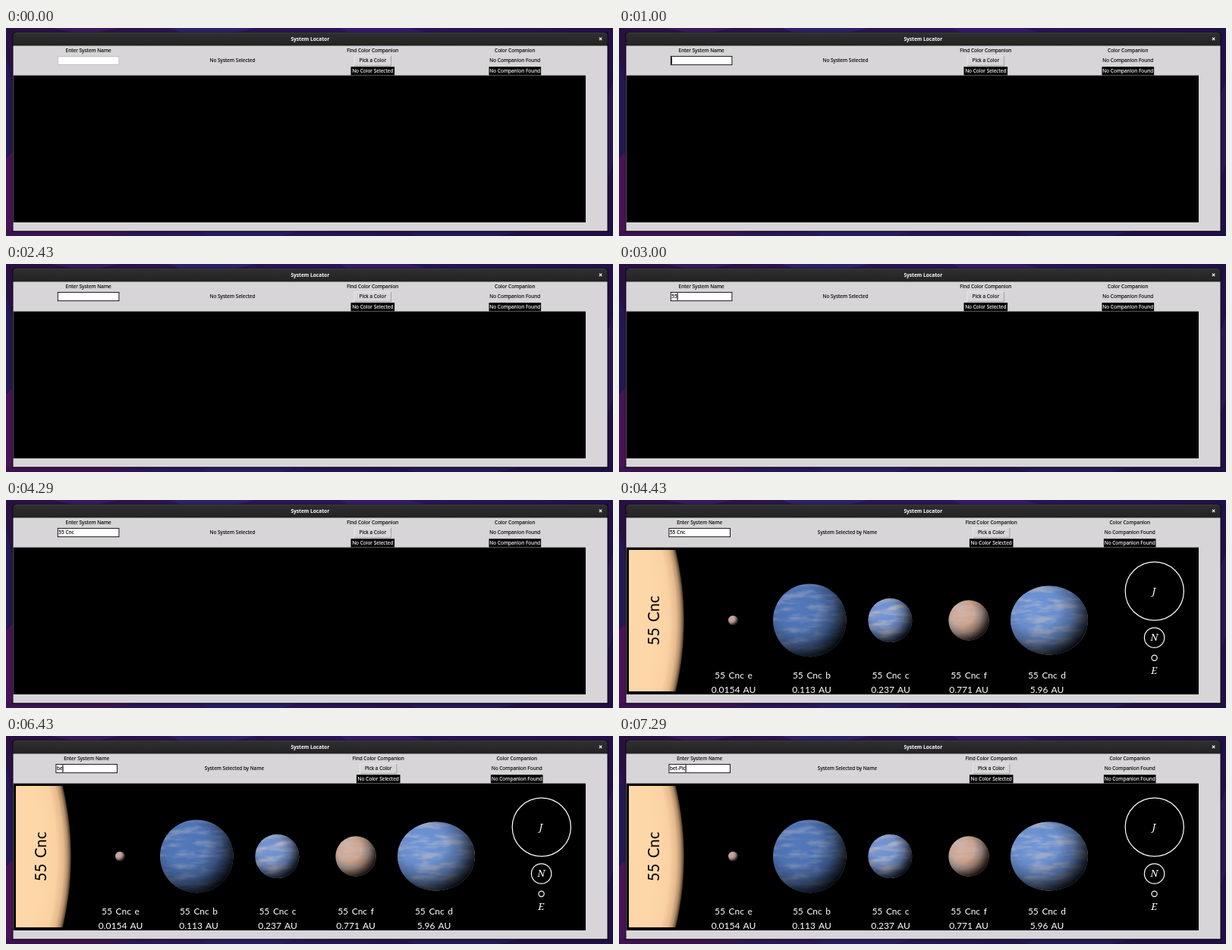
Write an HTML page that moves like this. It is 800x275 px and loops after 8000 ms.

```html
<!DOCTYPE html>
<html lang="en">
<head>
<meta charset="utf-8">
<title>System Locator</title>
<style>
  html, body { margin: 0; width: 100%; height: 100%; overflow: hidden; background: #21103f; }
  svg { display: block; width: 100vw; height: 100vh; }
  text { white-space: pre; }
  .ui { font: 500 6.5px "Noto Sans", "Open Sans", sans-serif; fill: #000; stroke: #000; stroke-width: .12; }
  .ui .inv { fill: #fff; stroke: #fff; }
  .mid { text-anchor: middle; }
  .title { font: 700 6.6px "Noto Sans", sans-serif; fill: #fff; }
  .cap { font: 12px Lato, "Open Sans", sans-serif; word-spacing: 1.5px; fill: #fff; }
  .star { font: 20.3px Lato, "Open Sans", sans-serif; word-spacing: 2.5px; }
  .math { font: italic 13px "Noto Serif", "Liberation Serif", serif; fill: #fff; }
</style>
</head>
<body>
<svg viewBox="0 0 800 275" preserveAspectRatio="none">
  <defs>
    <linearGradient id="desk" x2="1" y2=".25">
      <stop offset="0" stop-color="#28113f"/><stop offset=".3" stop-color="#2c1552"/>
      <stop offset=".6" stop-color="#28165a"/><stop offset="1" stop-color="#1f1044"/>
    </linearGradient>
    <linearGradient id="bar" x2="0" y2="1">
      <stop offset="0" stop-color="#303030"/><stop offset="1" stop-color="#222"/>
    </linearGradient>
    <radialGradient id="sun" gradientUnits="userSpaceOnUse" cx="-317" cy="159.5" r="403">
      <stop offset=".9" stop-color="#fed7a9"/><stop offset=".952" stop-color="#fad1a2"/>
      <stop offset=".975" stop-color="#e5ba8d"/><stop offset=".988" stop-color="#b38f6b"/>
      <stop offset=".996" stop-color="#6b543d"/><stop offset="1" stop-color="#20180f"/>
    </radialGradient>
    <radialGradient id="shade" cx=".33" cy=".32" r=".76">
      <stop offset="0" stop-opacity="0"/><stop offset=".4" stop-opacity=".06"/>
      <stop offset=".65" stop-opacity=".33"/><stop offset=".85" stop-opacity=".72"/>
      <stop offset="1" stop-opacity=".98"/>
    </radialGradient>
    <filter id="clouds" x="0" y="0" width="1" height="1" color-interpolation-filters="sRGB">
      <feTurbulence type="fractalNoise" baseFrequency=".035 .13" numOctaves="3" seed="8"/>
      <feColorMatrix values="0 0 0 0 .78  0 0 0 0 .76  0 0 0 0 .8  3.2 0 0 0 -1.35" result="n"/>
      <feComposite in="n" in2="SourceGraphic" operator="in"/>
    </filter>
    <clipPath id="view"><rect x="13" y="66" width="740" height="187"/></clipPath>
  </defs>

  <rect width="800" height="275" fill="url(#desk)"/>
  <g id="shards"></g>
  <path d="M8 270V10q0-5 5-5H789q5 0 5 5V270z" fill="#000" opacity=".45"/>
  <path d="M9.5 24V10q0-4 4-4H788.500q4 0 4 4V24z" fill="url(#bar)"/>
  <path d="M13 6.300H789" stroke="#484848" stroke-width=".6"/>
  <rect x="9.500" y="23.500" width="783" height="244.700" fill="#d8d5d8"/>
  <text class="title mid" x="400.800" y="17">System Locator</text>
  <path d="M781.900 12.700l3.400 3.400m0-3.400l-3.400 3.400" stroke="#fff" stroke-width="1.100"/>

  <g class="ui">
    <g id="colEntry">
      <text class="mid" y="31.700">Enter System Name</text>
      <rect id="box" x="-40.300" width="80.600"/>
      <text id="typed" x="-39.300" y="45.400"></text>
      <rect id="caret" y="38.300" width="1.100" height="9.600" stroke="none"/>
    </g>
    <text id="status" class="mid" y="45.400"></text>
    <g id="colFind">
      <text class="mid" y="31.700">Find Color Companion</text>
      <rect x="-24.500" y="36.500" width="49" height="13.500" fill="#d9d6d9" stroke="none"/>
      <path d="M-24.200 50V36.800H24" fill="none" stroke="#f0eef0" stroke-width=".7"/>
      <path d="M-24 49.800H24.200V36.800" fill="none" stroke="#8d8a8d" stroke-width=".7"/>
      <text class="mid" y="45.400">Pick a Color</text>
      <rect x="-28.800" y="51.200" width="57.600" height="11.200" stroke="none"/>
      <text class="mid inv" y="59.200">No Color Selected</text>
    </g>
    <g id="colMatch">
      <text class="mid" y="31.700">Color Companion</text>
      <text class="mid" y="45.400">No Companion Found</text>
      <rect x="-34.300" y="51.200" width="68.600" height="11.200" stroke="none"/>
      <text class="mid inv" y="59.200">No Companion Found</text>
    </g>
  </g>

  <rect x="9.700" y="62.700" width="754.300" height="194.300"/>
  <g id="system">
    <circle cx="-317" cy="159.500" r="403" fill="url(#sun)" clip-path="url(#view)"/>
    <text class="star mid" transform="translate(53 159.500) rotate(-90)">55 Cnc</text>
    <g id="planets"></g>
    <g fill="none" stroke="#fff" stroke-width="1.200">
      <circle cx="705.800" cy="120.500" r="38.600"/>
      <circle cx="705.600" cy="182" r="13.200"/>
      <circle cx="705.600" cy="208.800" r="3.600"/>
    </g>
    <g class="math mid">
      <text x="705" y="124.500">J</text>
      <text x="705.500" y="186.300">N</text>
      <text x="705.300" y="229.500">E</text>
    </g>
  </g>
</svg>
<script>
const $ = id => document.getElementById(id);
const LOOP = 8000, TICK = 1000 / 7;

// Desktop wallpaper facets: points, colour
$("shards").innerHTML = [
  ["0,40 9,75 9,165 0,170", "#231853"],
  ["0,172 9,164 9,275 0,275", "#481357"],
  ["0,268 180,268 130,275 0,275", "#3b124f"],
  ["60,0 150,0 120,6 90,6", "#371a5b"],
  ["215,0 330,0 300,6 230,6", "#30206a"],
  ["440,0 530,0 555,6 450,6", "#351a69"],
  ["250,268 390,268 360,275 270,275", "#2a1b60"],
  ["520,268 680,268 650,275 540,275", "#251654"],
  ["792,90 800,70 800,180 792,200", "#2a174f"]
].map(([p, c]) => `<polygon points="${p}" fill="${c}"/>`).join("");

// Planets: letter, distance, caption x, centre x, rx, ry, colour, cloud opacity
$("planets").innerHTML = [
  ["e", "0.0154", 151, 150.2, 6.2, 6.2, "#c9aaa3", 0],
  ["b", "0.113", 254, 251.3, 48.3, 48.3, "#5279bd", .38],
  ["c", "0.237", 358, 357.3, 29, 29, "#7597d6", .72],
  ["f", "0.771", 461, 461, 26.6, 26.6, "#d9ad95", .6],
  ["d", "5.96", 564, 567, 51, 45.5, "#6f96da", .6]
].map(([name, au, x, cx, rx, ry, color, haze]) => {
  const disc = `<ellipse cx="${cx}" cy="159" rx="${rx}" ry="${ry}"`;
  return `${disc} fill="${color}"/>
    ${haze ? `${disc} filter="url(#clouds)" opacity="${haze}"/>` : ""}
    ${disc} fill="url(#shade)"/>
    <text class="cap mid" x="${x}" y="235.500">55 Cnc ${name}</text>
    <text class="cap mid" x="${x}" y="255">${au} AU</text>`;
}).join("");

// Column centres before and after the search
const COLUMNS = { colEntry: [108.6, 106.2], status: [298.5, 301], colFind: [483.3, 490.7], colMatch: [670.8, 673.2] };
// Entry text from a given tick on
const TYPING = [
  [0, ""], [20, "5"], [21, "55"], [24, "55 "], [25, "55 C"], [27, "55 Cn"], [28, "55 Cnc"],
  [37, "55 C"], [38, "55 "], [39, "5"], [40, ""],
  [43, "b"], [44, "be"], [47, "bet"], [48, "bet-"], [49, "bet-P"], [51, "bet-Pic"]
];
const FOCUS = 7, FOUND = 31;

function caretOn(k) {
  return k >= FOCUS && k < 56 && (k >= 51 || (k !== 42 && (k - 6.4) % 6.3 < 4.2));
}

function setAttrs(el, attrs) {
  for (const name in attrs) el.setAttribute(name, attrs[name]);
}

function draw(t) {
  const k = Math.floor((t + 6) / TICK);
  const found = k >= FOUND, focus = k >= FOCUS;
  for (const id in COLUMNS)
    $(id).setAttribute("transform", `translate(${COLUMNS[id][+found]} 0)`);
  $("status").textContent = found ? "System Selected by Name" : "No System Selected";
  $("system").style.display = found ? "" : "none";
  setAttrs($("box"), {
    y: focus ? 37.4 : 37.9, height: focus ? 11.3 : 10.3,
    fill: "#fff", stroke: focus ? "#000" : "#aaa7aa", "stroke-width": focus ? .9 : .6
  });
  const text = TYPING.filter(([from]) => from <= k).pop()[1];
  $("typed").textContent = text;
  $("caret").setAttribute("x", -39.8 + (text ? $("typed").getComputedTextLength() + .3 : 0));
  $("caret").style.display = caretOn(k) ? "" : "none";
}

function frame() {
  draw(performance.now() % LOOP);
  requestAnimationFrame(frame);
}
frame();
</script>
</body>
</html>
```
